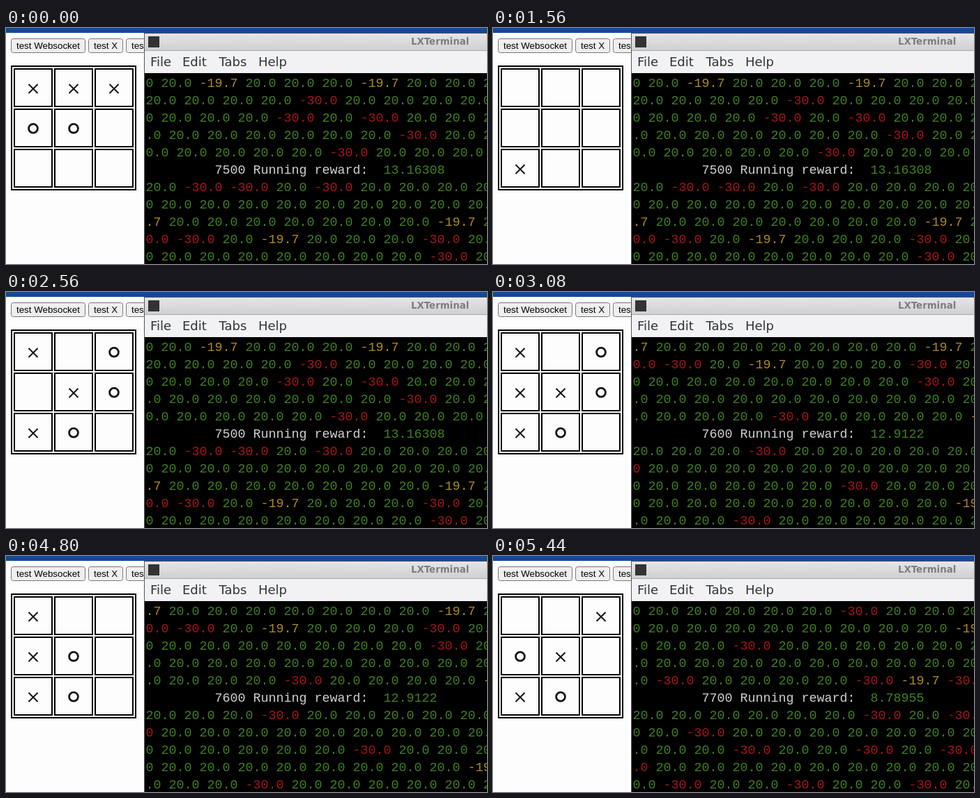
These frames come from a looping animation (690x340 px, 5.48 s). An HTML page:

```html
<!DOCTYPE html>
<html>
<head>
<meta charset="utf-8">
<style>
html, body { margin: 0; width: 100%; height: 100%; overflow: hidden; background: #fdfdfd; }
svg { display: block; }
text { white-space: pre; }
.term text { font-family: "Liberation Mono", monospace; }
.button { font: 13.333px "Liberation Sans", Arial, sans-serif; }
.menu { font: 18px "DejaVu Sans", sans-serif; fill: #2e3436; }
.title { font: bold 13.33px "DejaVu Sans", sans-serif; fill: #7b7d82; }
.mark { font: 25px "DejaVu Sans", sans-serif; fill: #e01b24; text-anchor: middle; }
</style>
</head>
<body>
<svg id="stage" width="690" height="340" viewBox="0 0 690 340"></svg>
<script>
const LOOP = 5480, CELL = 11;

// g, r, y stand for rewards; cut is the number of characters lost to the left edge
const REWARD = { g: ['20.0', '#437f22'], r: ['-30.0', '#a3161c'], y: ['-19.7', '#ac8a22'] };
const tail1 = ['3ygggggggyg', '2rrgygggrg', '3ggggggggrg'];
const tail2 = ['3ggggggrggg', '3gggggggggy', '2gggrgggggg'];
const screens = [
  { from: 0, lines: ['3ggygggygggg', '0ggggrgggg', '3ggggrgrggg', '2gggggggrgg', '1gggggrgggg',
    '7500 13.16308', '0grrgrgggg', '3gggggggggg', ...tail1] },
  { from: 2600, lines: [...tail1, '2gggggggggg', '2ggggrggggy',
    '7600 12.9122', '0gggrggggg', '4rggggggggg', ...tail2] },
  { from: 4920, lines: [...tail2, '2gggggggggg', '2grggggryr',
    '7700 8.78955', '0ggggggrgr', '3ggrggggggg', '2gggrggrgr', '3rggggggggg', '1grggrggrg'] }
];

// [time, board], read row by row
const boards = [
  [0, 'XXXOO....'],
  [40, 'X........'], [160, 'X.O......'], [280, 'X.OX.....'], [400, 'X.OX.O...'], [520, 'X.OX.OX..'],
  [1240, '.........'], [1400, '......X..'], [1600, '..O...X..'], [1800, 'X.O...X..'],
  [2000, 'X.O..OX..'], [2200, 'X.O!XOX..'], [2400, 'X.O.XOXO.'], [2600, 'X.OXXOXO.'],
  [3960, '.........'], [4000, 'X........'], [4160, 'X...O....'], [4320, 'X...O.X..'],
  [4480, 'X...O.XO.'], [4640, 'X..XO.XO.'],
  [4960, '.........'], [5000, '....X....'], [5100, '...OX....'], [5200, '...OX.X..'],
  [5300, '...OX.XO.'], [5400, '..XOX.XO.']
];

const rect = (x, y, w, h, more) => `<rect x="${x}" y="${y}" width="${w}" height="${h}" ${more}/>`;
const text = (x, y, s, more = '') => `<text x="${x}" y="${y}" ${more}>${s}</text>`;
const span = (s, color) => `<tspan fill="${color}">${s}</tspan>`;

function termLine(line, row) {
  const y = 85 + 25 * row;
  if (line.includes(' ')) {
    const [count, value] = line.split(' ');
    return text(200.5 + 9 * CELL, y, span(count + ' Running reward:  ', '#cfd2cd') + span(value, REWARD.g[1]));
  }
  const body = [...line.slice(1)].map((kind, i) => {
    const [s, color] = REWARD[kind];
    return span((i ? s : s.slice(+line[0])) + ' ', color);
  });
  return text(200.5, y, body.join(''));
}

function button(x, w, label) {
  return rect(x + .5, 15.5, w - 1, 20, 'rx="3" fill="#efefef" stroke="#767676"') +
    text(x + 8, 30, label, 'class="button"');
}

function drawBoard(board) {
  return [...board].map((c, i) => {
    const x = 39 + 58 * (i % 3), y = 87 + 58 * Math.floor(i / 3);
    if (c === 'X') return `<path d="M${x - 6.5} ${y - 6}l13 13m0-13l-13 13" stroke="#111" stroke-width="2"/>`;
    if (c === 'O') return `<circle cx="${x}" cy="${y - .3}" r="6.4" fill="none" stroke="#111" stroke-width="2.8"/>`;
    return c === '!' ? text(x, y + 8.5, '!', 'class="mark"') : '';
  }).join('');
}

// Size the monospace text so one character fills one terminal column
const pen = document.createElement('canvas').getContext('2d');
pen.font = '100px "Liberation Mono", monospace';
const termSize = 100 * CELL / pen.measureText('0').width;

let cells = '';
for (let i = 0; i < 9; i++) cells += rect(12 + 58 * (i % 3), 59 + 58 * Math.floor(i / 3), 54, 54, '');

const stage = document.getElementById('stage');
stage.innerHTML = `
  <defs><linearGradient id="bar" x2="0" y2="1">
    <stop stop-color="#e6e6e8"/><stop offset="1" stop-color="#cfcfd1"/>
  </linearGradient></defs>
  ${rect(0, 0, 690, 340, 'fill="#fdfdfd"')}
  ${rect(0, 0, 690, 7, 'fill="#124a94"')}
  ${button(7, 107, 'test Websocket')}${button(118, 50, 'test X')}${button(172, 52, 'test O')}
  <g fill="none" stroke="#000" stroke-width="2">${rect(8, 55, 178, 178, '')}${cells}</g>
  <g id="board"></g>
  ${rect(198, 7, 492, 333, 'fill="#555"')}
  ${rect(199, 8, 491, 25, 'fill="url(#bar)"')}
  ${rect(199, 32, 491, 1, 'fill="#a8a8aa"')}
  ${rect(199, 33, 491, 32, 'fill="#f2f2f4"')}
  ${rect(199, 65, 491, 275, 'fill="#000"')}
  ${rect(204, 12, 16, 16, 'fill="#333"')}
  ${text(581, 24, 'LXTerminal', 'class="title"')}
  <g class="menu">${[[207, 'File'], [253, 'Edit'], [305.5, 'Tabs'], [362, 'Help']]
    .map(([x, s]) => text(x, 54.5, s)).join('')}</g>
  <g id="term" class="term" font-size="${termSize}"></g>`;

const boardEl = document.getElementById('board'), termEl = document.getElementById('term');
const boardViews = boards.map(b => drawBoard(b[1]));
const termViews = screens.map(s => s.lines.map(termLine).join(''));
const boardTimes = boards.map(b => b[0]), termTimes = screens.map(s => s.from);

function show(el, views, times, t) {
  const i = times.filter(start => start <= t).length - 1;
  if (el.shown !== i) {
    el.innerHTML = views[i];
    el.shown = i;
  }
}

const begin = performance.now();
function frame() {
  const t = (performance.now() - begin) % LOOP;
  show(boardEl, boardViews, boardTimes, t);
  show(termEl, termViews, termTimes, t);
  requestAnimationFrame(frame);
}
frame();
</script>
</body>
</html>
```
